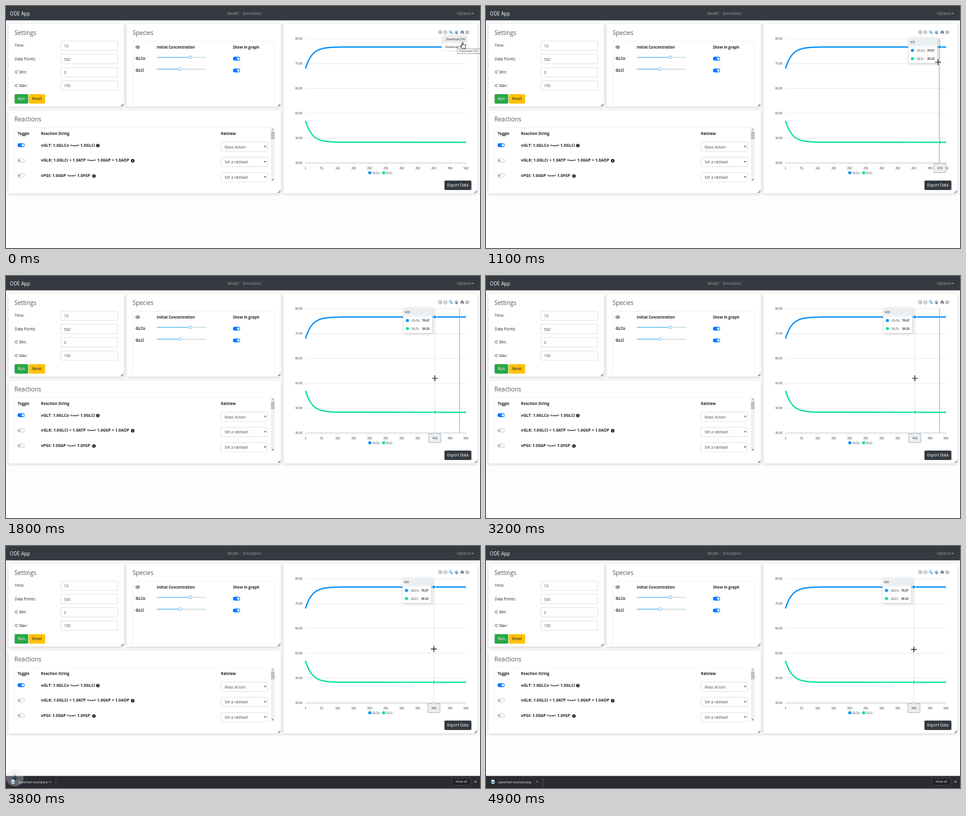
Recreate the animation shown at these times as an HTML page. Size 800 px wide and 409 px high, loop 5 s.

```html
<!DOCTYPE html>
<html lang="en">
<head>
<meta charset="utf-8">
<title>ODE App</title>
<style>
  html, body { margin: 0; width: 100%; height: 100%; overflow: hidden; background: #fdfdfd; }
  svg { display: block; width: 100%; height: 100%; }
  text { font-family: "Open Sans", "Noto Sans", sans-serif; fill: #212529; white-space: pre; }
  .b { font-weight: 700; }
  .c { font-family: "Liberation Sans", Arial, sans-serif; fill: #373d3f; }
  .card { fill: #fff; filter: drop-shadow(0 1.5px 2.5px rgba(0, 0, 0, .2)); }
</style>
</head>
<body>
<svg id="stage" viewBox="0 0 800 409" xmlns="http://www.w3.org/2000/svg"></svg>
<script>
const stage = document.getElementById('stage');
const BLUE = '#008ffb', GREEN = '#00e396', ICON = '#6e8192', DARK = '#343a40';
const LEFT = 505.5, WIDTH = 271, TOP = 55.3, BOTTOM = 265.3;

// ---- drawing helpers (text is placed by its vertical centre) ----
const text = (x, y, size, str, attrs = '') =>
  `<text x="${x}" y="${(y + size * .36).toFixed(2)}" font-size="${size}" ${attrs}>${str}</text>`;
const bold = (x, y, str, size = 6.3) => text(x, y, size, str, 'class="b"');
const mid = (x, y, size, str, attrs = '') => text(x, y, size, str, 'text-anchor="middle" ' + attrs);
const rect = (x, y, w, h, fill, attrs = '') =>
  `<rect x="${x}" y="${y}" width="${w}" height="${h}" fill="${fill}" ${attrs}/>`;
const dot = (x, y, r, fill, attrs = '') => `<circle cx="${x}" cy="${y}" r="${r}" fill="${fill}" ${attrs}/>`;
const stroke = (d, color, w = 1, attrs = '') =>
  `<path d="${d}" fill="none" stroke="${color}" stroke-width="${w}" ${attrs}/>`;
const shape = (d, fill, attrs = '') => `<path d="${d}" fill="${fill}" ${attrs}/>`;
const group = (id, body) => `<g id="${id}">${body}</g>`;

function card(x, y, w, h, title) {
  const r = x + w, b = y + h;
  return rect(x, y, w, h, '#fff', 'class="card"') +
    stroke(`M${r - 1.7} ${b - 5}v3.3h-3.6`, '#444', .9) +
    (title ? text(x + 10, y + 15.8, 10, title, 'style="fill:#50565c"') : '');
}

const field = (x, y, w) => rect(x, y, w, 15.8, '#fff', 'rx="1.8" stroke="#ced4da" stroke-width=".7"');

function toggle(x, y, on) {
  return on
    ? rect(x - 6, y - 3.2, 12, 6.4, '#007bff', 'rx="3.2"') + dot(x + 3, y, 2.1, '#fff')
    : rect(x - 5.7, y - 3, 11.4, 6, '#fff', 'rx="3" stroke="#adb5bd" stroke-width=".7"') + dot(x - 3, y, 2, '#adb5bd');
}

const button = (x, y, w, fill, label, color) =>
  rect(x, y, w, 16, fill, 'rx="1.8"') + mid(x + w / 2, y + 8, 6.5, label, `style="fill:${color}"`);

// ---- page ----
function navbar() {
  const grey = 'style="fill:#9a9da0"';
  return rect(0, 0, 800, 24.3, DARK) +
    text(6.6, 13, 8.1, 'ODE App', 'style="fill:#fff"') +
    text(373.8, 13, 6.4, 'Model', grey) + text(399.6, 13, 6.3, 'Simulation', grey) +
    text(760.8, 13, 6.5, 'Options', grey) + shape('M786 11.8h4l-2 2.2z', '#9a9da0');
}

function settings() {
  const rows = [['Time:', 10], ['Data Points:', 500], ['IC Min:', 0], ['IC Max:', 100]];
  return card(4.3, 30, 194.7, 140, 'Settings') +
    rows.map(([label, value], i) => {
      const y = 67.2 + i * 22.45;
      return text(14.8, y, 6.3, label) + field(92.3, y - 8, 96.5) +
        text(98, y + .6, 6.4, value, 'style="fill:#495057"');
    }).join('') +
    button(14.5, 149, 23, '#28a745', 'Run', '#fff') +
    button(38.5, 149, 27.5, '#ffc107', 'Reset', '#212529');
}

function species() {
  const row = (y, name, x) => bold(218.8, y, name, 6.4) +
    rect(254.5, y - 3, x - 254.5, 1.5, '#6fc0f5') + rect(x, y - 3, 338 - x, 1.5, '#c9dbe6') +
    dot(x, y - 2.3, 2.5, '#fff', 'stroke="#69c0ff" stroke-width="1"') + toggle(389, y, true);
  return card(203.8, 30, 260, 140, 'Species') +
    stroke('M214.3 167V59.4H453.5V167', '#eceef0', .7) +
    bold(218.8, 69.3, 'ID', 6.4) + bold(254.6, 69.3, 'Initial Concentration', 6.2) +
    bold(383, 69.3, 'Show in graph') +
    row(89, 'GLCo', 311) + row(109, 'GLCi', 293.5);
}

function reactions() {
  const row = (y, eq, infoX, law, on) => toggle(25.5, y, on) + bold(59, y, eq, 6.85) +
    dot(infoX, y + .6, 2.9, '#111') + rect(infoX - .5, y, 1, 2.2, '#fff') + rect(infoX - .5, y - 1.2, 1, .8, '#fff') +
    field(362.7, y - 5.2, 79) + text(369, y + 3.2, 6.35, law, 'style="fill:#495057"') +
    shape(`M435.8 ${y + 1.4}h3.2l-1.6 2.4z`, '#333');
  return card(4.3, 177, 459.5, 139.7, 'Reactions').replace('y="196.4', 'y="195.4') +
    stroke('M14.3 297V205.4H454', '#eceef0', .7) +
    bold(19.6, 215.3, 'Toggle') + bold(59, 215.3, 'Reaction String') + bold(362.8, 215.3, 'Ratelaw', 6.2) +
    row(235.2, 'vGLT: 1.0GLCo &lt;==&gt; 1.0GLCi', 155, 'Mass Action', true) +
    row(260.9, 'vGLK: 1.0GLCi + 1.0ATP &lt;==&gt; 1.0G6P + 1.0ADP', 213.8, 'Set a ratelaw!') +
    row(286.7, 'vPGI: 1.0G6P &lt;==&gt; 1.0F6P', 148.4, 'Set a ratelaw!') +
    rect(362, 297.6, 81, 2, '#fff') +
    rect(446.8, 205.4, 7, 92, '#f1f1f1') + rect(447.3, 212, 6, 13.3, '#c1c1c1') +
    shape('M448.7 209.6h3l-1.5-2z', '#777') + shape('M448.7 292.8h3l-1.5 2z', '#444');
}

// ---- chart ----
const valueY = v => TOP + (80 - v) * 4.2;

function curve(from, to, color) {
  let d = '';
  for (let x = 0; x <= WIDTH; x += x < 60 ? 1 : WIDTH - 60) {
    const v = to + (from - to) * Math.exp(-x / 11);
    d += `${d ? 'L' : 'M'}${LEFT + x} ${valueY(v).toFixed(2)}`;
  }
  return stroke(d, color, 2.2);
}

function toolbar() {
  const y = 44.4;
  const ring = x => stroke(`M${x - 1.5} ${y}h3`, ICON, .7) +
    dot(x, y, 2.8, 'none', `stroke="${ICON}" stroke-width=".8"`);
  return ring(733) + stroke(`M733 ${y - 1.5}v3`, ICON, .7) + ring(741.5) +
    dot(750.3, 43.6, 1.9, 'none', `stroke="${BLUE}" stroke-width="1"`) + stroke('M751.7 45l2.3 2.3', BLUE, 1.2) +
    stroke('M758.6 45.8v-3.4M759.8 45v-3.6M761 45v-3.3M762.2 45.6v-2.8M757.2 44.4l1.6 2.2h3', ICON, .8) +
    shape('M759 45h3.4v1.6l-1 1h-1.6z', ICON) +
    shape('M770 41l3.6 3.3h-1v3h-1.8v-2h-1.6v2h-1.8v-3h-1z', ICON) +
    stroke('M775.4 42.6h6.2M775.4 44.5h6.2M775.4 46.4h6.2', ICON, .9);
}

function chart() {
  let out = card(468.8, 30, 327, 286.7);
  for (let i = 0; i < 6; i++) {
    const y = TOP + i * 42;
    out += stroke(`M${LEFT} ${y}h${WIDTH}`, i < 5 ? '#e3e3e3' : '#9a9c9e', i < 5 ? .7 : .6) +
      text(500.3, y - .2, 4.8, (80 - i * 10) + '.00', 'class="c" text-anchor="end"');
  }
  for (let i = 0; i < 11; i++) {
    const x = LEFT + .2 + i * 27.07;
    out += stroke(`M${x} ${BOTTOM}v2.4`, '#c4c8ca', .6) +
      mid(x, 273.8, 5, i < 9 ? i * 50 + 1 : i * 50, 'class="c"');
  }
  return out + curve(68, 76.67, BLUE) + curve(47, 38.33, GREEN) +
    dot(614, 281.8, 2.6, BLUE) + text(618, 281.8, 4.9, 'GLCo', 'class="c"') +
    dot(637.4, 281.8, 2.6, GREEN) + text(641, 281.8, 4.9, 'GLCi', 'class="c"') +
    button(740, 295, 45.5, DARK, 'Export Data', '#fff') + toolbar();
}

// Everything in "follow" is drawn around x = 0, the hovered point.
function hover() {
  const mark = (v, color) => dot(0, valueY(v), 2.7, color, 'stroke="#fff" stroke-width=".9"');
  const line = (y, color, name, value) => dot(-46.3, y, 2.6, color) +
    text(-38.8, y, 5, name, 'class="c"') + text(-21.6, y, 5, value, 'class="c b"');
  return stroke(`M0 ${TOP}V${BOTTOM}`, '#b6b6b6', .7, 'id="cross" stroke-dasharray="1.4 1.2"') +
    group('follow',
      mark(76.67, BLUE) + mark(38.33, GREEN) +
      rect(-53, 54.3, 48.6, 42.4, '#fff', 'fill-opacity=".96" stroke="#e3e3e3" stroke-width=".7" rx="2" style="filter:drop-shadow(1px 1px 2px #0003)"') +
      shape('M-52.7 67.6V56.3q0-1.7 1.7-1.7h44.6q1.7 0 1.7 1.7v11.3z', '#eceff1') +
      text(-50.6, 61.2, 5, '', 'class="c num"') +
      line(75, BLUE, 'GLCo:', '76.67') + line(88.8, GREEN, 'GLCi:', '38.33') +
      shape('M-10.2 266.4h7.6l2.6-2.4 2.6 2.4h7.6v15.2h-20.4z', '#eceff1', 'stroke="#90a4ae" stroke-width=".7"') +
      mid(0, 273.9, 5, '', 'class="c num"'));
}

function menu() {
  return rect(735.8, 49.8, 42.6, 26.4, '#fff', 'rx="1" stroke="#ddd" stroke-width=".7"') +
    rect(736.3, 0, 41.6, 12, '#ececec', 'id="lit"') +
    text(742.4, 56.7, 4.8, 'Download SVG') + text(741.6, 69.2, 4.8, 'Download PNG') ;
}

const hint = (id, x, y, label) => group(id,
  rect(x, y, 38, 8.4, '#fff', 'stroke="#767676" stroke-width=".7"') +
  mid(x + 19, y + 4.3, 4.75, label, 'style="fill:#444"'));

const hand = group('hand', shape('M3 0C2.2 0 2 .5 2 1v4.2l-.8-.8C.6 3.9-.2 4.5.2 5.2l2 3.2v1.4h4.6V8.4l.7-1.6V4.2c0-.9-1.2-.9-1.3-.2 0-1-1.3-1-1.4-.2 0-1-1.3-.9-1.4-.1V1C4 .4 3.7 0 3 0z',
  '#fff', 'stroke="#111" stroke-width=".8" transform="scale(1.1)"'));

// ---- download shelf, drawn with its top at y = 0 ----
function shelf() {
  const white = 'style="fill:#e8eaed"';
  return group('shelf',
    rect(0, 0, 800, 21, '#292b30') +
    shape('M9.2 6.3h3.6l1.6 1.6v5.2H9.2z', '#f1f3f4') + rect(9.9, 9.2, 3.6, 2.7, '#3a8fd8') +
    text(20.8, 10.8, 5.05, 'apexchart-example.png', white) +
    group('end', rect(-14, 1, 30, 19, '#292b30', 'id="mask"') +
      stroke('M-11.8 11l1.8-1.8L-8.2 11', '#e8eaed', .8) + stroke('M0 3.5v13.5', '#5f6368', .7)) +
    rect(752.7, 3.7, 31.8, 12.2, '#202124', 'rx="1.8" stroke="#5f6368" stroke-width=".6"') +
    mid(768.6, 9.8, 4.95, 'Show all', white) +
    stroke('M790.6 7.9l3.6 3.6m0-3.6l-3.6 3.6', '#e8eaed', .8));
}

const badge = group('badge', dot(15, 15, 14.8, '#dfe6ea') +
  shape('M13.2 8.5h3.6v6h3.4L15 20l-5.2-5.5h3.4z', '#1a7fd4'));

stage.innerHTML = rect(0, 0, 800, 409, '#fdfdfd') + navbar() + settings() + species() + reactions() + chart() +
  stroke(`M765.6 ${TOP}V${BOTTOM}`, '#8fa3a6', .9, 'id="select"') +
  group('hover', hover()) + group('menu', menu()) +
  hint('hintSvg', 762, 72.2, 'Download SVG') + hint('hintPng', 761.2, 82, 'Download PNG') +
  hand + stroke('M-5 0H5M0-5V5', '#111', 1.2, 'id="plus"') + shelf() + badge;

// ---- motion ----
const $ = id => document.getElementById(id);
const nums = document.querySelectorAll('.num');
const show = (id, on) => { $(id).style.display = on ? '' : 'none'; };
const move = (id, x, y) => $(id).setAttribute('transform', `translate(${x.toFixed(2)} ${y.toFixed(2)})`);
const clamp = v => Math.min(1, Math.max(0, v));

// time, x, y
const handPath = [[0, 767.5, 61.5], [100, 766.6, 65], [200, 764.6, 69.6], [300, 763.8, 71]];
const plusPath = [[1000, 766, 78], [1100, 763, 95], [1200, 756, 118], [1300, 744, 141], [1400, 729.7, 160],
  [1500, 726, 167], [1600, 724.3, 171.5], [1700, 723.8, 173], [3300, 723.8, 173], [3600, 722.2, 174.2],
  [4400, 722.2, 174.2], [4500, 722.2, 174.8]];

function along(path, t) {
  const i = path.findIndex(p => p[0] > t);
  if (i < 1) return (i ? path[path.length - 1] : path[0]).slice(1);
  const a = path[i - 1], b = path[i], u = (t - a[0]) / (b[0] - a[0]);
  return [a[1] + (b[1] - a[1]) * u, a[2] + (b[2] - a[2]) * u];
}

function render(ms) {
  const t = Math.floor(ms / 100) * 100;
  const open = t < 1000;

  show('menu', open);
  show('hand', open);
  show('hintSvg', t < 100);
  show('hintPng', t >= 800 && open);
  $('lit').setAttribute('y', t < 100 ? 50.4 : 63);
  move('hand', ...along(handPath, t));

  show('plus', !open);
  show('hover', t >= 1100);
  show('select', !open && t < 3400);
  move('plus', ...along(plusPath, t));

  const index = Math.round((along(plusPath, t - 12)[0] - LEFT) / WIDTH * 499) + 1;
  move('cross', LEFT + (index - 1) / 499 * WIDTH, 0);
  move('follow', along(plusPath, t - 100)[0], 0);
  nums.forEach(n => { n.textContent = index; });

  const rise = 1 - (1 - clamp((t - 3250) / 200)) ** 2;
  const grow = 1 - (1 - clamp((t - 3350) / 800)) ** 2.5;
  show('shelf', rise > 0);
  move('shelf', 0, 409 - 20.4 * rise);
  move('end', 96.3 * grow, 0);
  $('mask').setAttribute('width', 100 - 90 * grow);

  const fall = clamp((t - 3250) / 600);
  move('badge', 0, 349 + 30 * fall);
  $('badge').setAttribute('opacity', 1 - 4 * (fall - .5) ** 2);
}

const start = performance.now();
function tick() {
  render((performance.now() - start) % 5000);
  requestAnimationFrame(tick);
}
tick();
</script>
</body>
</html>
```
